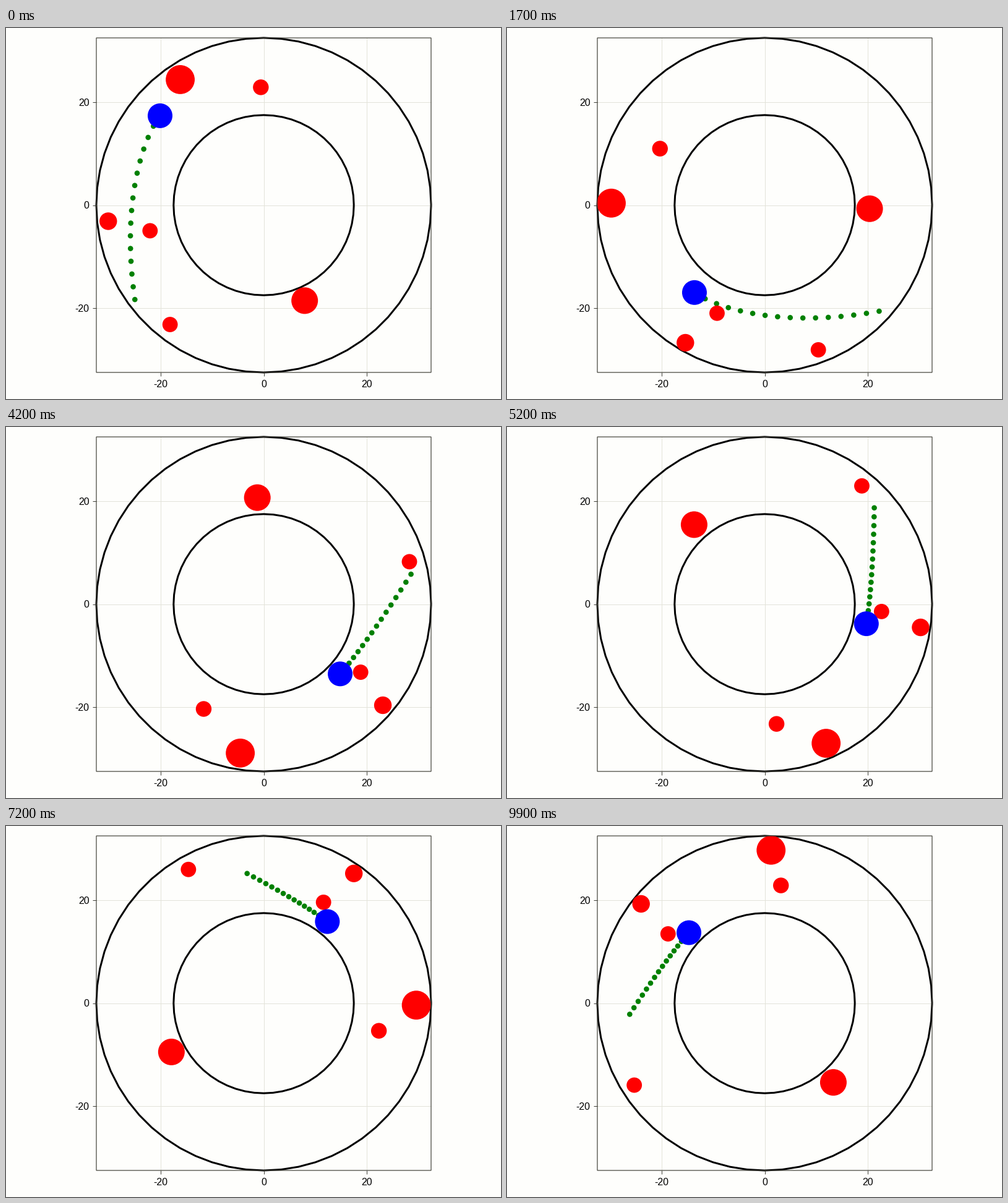
These frames come from a looping animation (800x600 px, 10 s). A matplotlib script:

```python
import numpy as np
import matplotlib.pyplot as plt
from matplotlib.animation import FuncAnimation
from matplotlib.patches import Circle, Rectangle

FRAMES, STEP = 100, 100      # count, ms
CX, CY, UNIT = 416.5, 286.5, 8.325
PX = 0.72                    # one pixel in points at 100 dpi
BG, GRID, FRAME = "#fefefc", "#e3e3da", "#404038"

SWING = 4.6                  # how far obstacles drift outwards, px
MEET = 2.04                  # the agent catches up with its leader, s
HORIZON = 15                 # dots in the planned path

# size, start angle (deg), speed (deg/s), inner radius, drift period (s)
LEADER = (12.4, 192.7, 31.48, 188.3, 6.1)
OBSTACLES = [
    LEADER,
    (23.4, 123.6, 32.73, 243.8, 4.2),
    (12.7, 91.4, 35.43, 190.7, 8.3),
    (14.2, 185.9, 31.85, 252.6, 4.2),
    (21.5, 293.2, 38.15, 168.0, 8.3),
    (12.4, 231.9, 34.37, 245.3, 4.2),
]


def polar(r, deg):
    return r * np.exp(1j * np.radians(deg))


def to_px(z):
    return CX + z.real, CY - z.imag


def mix(a, b, u):
    return a + (b - a) * u


def obstacle(t, start, speed, radius, period):
    drift = SWING * (1 - np.cos(2 * np.pi * t / period)) / 2
    return polar(radius + drift, start + speed * t)


def agent_state(t):
    """Close the gap to the leader on an inward curve, then stay behind it."""
    s = min(t / MEET, 1)
    gap = mix(53.5, 7.3, s)
    radius = 167.3 + 54 * np.cos(np.pi / 2 * s)
    return radius, LEADER[1] + LEADER[2] * t - gap


def plan(t, heading):
    """Offsets of the planned path: long and curved at first, then short."""
    u = np.clip((t - 1.7) / 1.1, 0, 1)
    x = np.arange(1, HORIZON + 1) / HORIZON
    follow = 171 + 27 * np.cos(2 * np.pi * (t - 4) / 8.4)
    length = mix(300, follow, u) * mix(x, x * x, 0.17 * u)
    return polar(length, heading + mix(33, 7, u) * np.sqrt(x))


fig = plt.figure(figsize=(8, 6), dpi=100, facecolor=BG)
ax = fig.add_axes([0, 0, 1, 1])
ax.set_xlim(0, 800)
ax.set_ylim(600, 0)
ax.axis("off")


def line(x, y, color, width, z):
    ax.plot(x, y, color=color, lw=width * PX, zorder=z, solid_capstyle="butt")


def disc(size, color, z):
    return ax.add_patch(Circle((0, 0), size, fc=color, lw=0, zorder=z))


font = dict(family="Liberation Sans", size=16 * PX, color="black")
for v in (-20, 0, 20):
    x, y = CX + v * UNIT, CY - v * UNIT
    line([x, x], [16, 557], GRID, 1, 1)
    line([146, 687], [y, y], GRID, 1, 1)
    line([x, x], [557, 563], FRAME, 1, 6)
    line([140, 146], [y, y], FRAME, 1, 6)
    ax.text(x, 581, str(v), ha="center", va="baseline", **font)
    ax.text(134.5, y + 5.7, str(v), ha="right", va="baseline", **font)

turn = np.linspace(0, 2 * np.pi, 61)
for r in (17.5, 32.5):
    line(CX + r * UNIT * np.cos(turn), CY - r * UNIT * np.sin(turn), "black", 3, 2)
ax.add_patch(Rectangle((146, 16), 541, 541, fill=False, ec=FRAME, lw=1.2 * PX,
                       zorder=6, snap=False))

dots = [disc(4.3, "#008000", 3) for _ in range(HORIZON)]
reds = [disc(o[0], "#ff0000", 3.5) for o in OBSTACLES]
agent = disc(20, "#0000ff", 4)


def update(i):
    t = i * STEP / 1000
    for patch, (_, *motion) in zip(reds, OBSTACLES):
        patch.center = to_px(obstacle(t, *motion))

    radius, angle = agent_state(t)
    pos = polar(radius, angle)
    agent.center = to_px(pos)
    for dot, z in zip(dots, pos + plan(t, angle + 90)):
        dot.center = to_px(z)
    return [*dots, *reds, agent]


anim = FuncAnimation(fig, update, frames=FRAMES, interval=STEP, repeat=True,
                     repeat_delay=0, blit=False)
plt.show()
```
